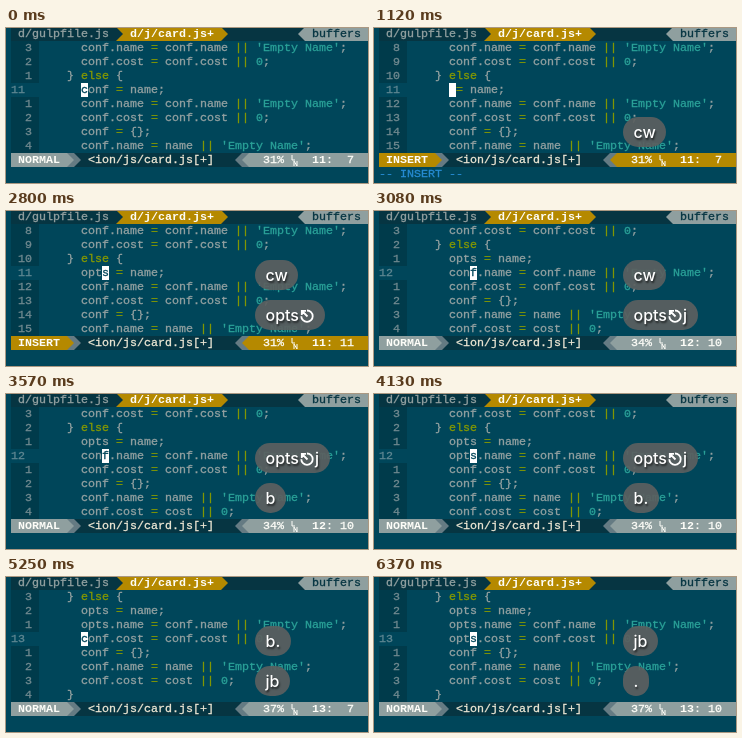
These frames come from a looping animation (362 by 155 pixels, 7070 ms). An HTML page:

```html
<!DOCTYPE html>
<html lang="en">
<head>
<meta charset="utf-8">
<title>Editor session</title>
<style>
  html, body { margin: 0; width: 100%; height: 100%; overflow: hidden; background: #00465a; }
  #stage { position: relative; width: 362px; height: 155px; overflow: hidden; }
  #screen { display: block; }
  #screen text { font-family: "Liberation Mono", monospace; font-size: 11.667px; white-space: pre; }
  .key {
    position: absolute; left: 249px; height: 30px; padding: 0 10.5px;
    border-radius: 15px; background: rgba(92, 96, 96, .92); color: #fff;
    font: 500 16px/30px Inter, sans-serif; white-space: pre;
    text-shadow: 1px 2px 2px rgba(0, 0, 0, .6);
  }
  .key svg { width: 16px; height: 16px; vertical-align: -3px; fill: none; stroke: #fff; stroke-width: 1.8; }
</style>
</head>
<body>
<div id="stage">
  <svg id="screen" width="362" height="155"></svg>
  <div id="keys"></div>
</div>
<script>
const LOOP = 7070, CELL = 7, ROW = 14, TOP = 13, LEFT = 5, CODE = 33;
const C = {
  back: '#00465a', gutter: '#003b4b', bar: '#063542', text: '#93a1a1', number: '#718a90',
  current: '#5f8792', green: '#859900', cyan: '#2aa198', blue: '#268bd2',
  yellow: '#b58900', grey: '#8f9f9f', slate: '#657b83', light: '#eee8d5', white: '#fdfdf8'
};

// Each step changes part of the state; keys run from newest to oldest.
const steps = [
  [0, { top: 8, line: 11, col: 7, shown: 0, mode: 'NORMAL', message: false,
        first: 'conf', second: 'conf', third: 'conf', keys: [], fade: 1 }],
  [700, { keys: ['c'] }],
  [1050, { keys: ['cw'] }],
  [1120, { mode: 'INSERT', message: true, first: '' }],
  [1750, { keys: ['o', 'cw'], first: 'o', col: 8 }],
  [1890, { keys: ['op', 'cw'], first: 'op', col: 9 }],
  [2170, { keys: ['opt', 'cw'] }],
  [2240, { first: 'opt', col: 10 }],
  [2310, { keys: ['opts', 'cw'] }],
  [2380, { first: 'opts', col: 11 }],
  [2730, { keys: ['opts⎋', 'cw'] }],
  [2800, { message: false, col: 10, shown: 11 }],
  [2940, { keys: ['opts⎋j', 'cw'] }],
  [3010, { mode: 'NORMAL', shown: 0 }],
  [3080, { top: 9, line: 12 }],
  ...fadeOut(3150, ['opts⎋j']),
  [3570, { keys: ['b', 'opts⎋j'] }],
  [3640, { col: 7 }],
  [4060, { keys: ['b.', 'opts⎋j'] }],
  [4130, { second: 'opts', col: 10 }],
  [4620, { keys: ['j', 'b.', 'opts⎋j'], top: 10, line: 13 }],
  [5040, { keys: ['jb', 'b.', 'opts⎋j'] }],
  [5110, { col: 7 }],
  ...fadeOut(5040, ['jb', 'b.']),
  [5390, { keys: ['.', 'jb', 'b.'], third: 'opts', col: 10 }],
  ...fadeOut(6160, ['.', 'jb'])
].sort((a, b) => a[0] - b[0]);

function fadeOut(start, left) {
  return [.75, .5, .25, 0].map((fade, i) =>
    [start + i * 70, fade ? { fade } : { fade: 1, keys: left }]);
}

const buffer = s => [
  "      conf.name = conf.name || 'Empty Name';",
  "      conf.cost = conf.cost || 0;",
  "    } else {",
  `      ${s.first} = name;`,
  `      ${s.second}.name = conf.name || 'Empty Name';`,
  `      ${s.third}.cost = conf.cost || 0;`,
  "      conf = {};",
  "      conf.name = name || 'Empty Name';",
  "      conf.cost = cost || 0;",
  "    }"
];

const escapeText = str => str.replace(/&/g, '&amp;').replace(/</g, '&lt;');
const rect = (x, y, w, h, fill) => `<rect x="${x}" y="${y}" width="${w}" height="${h}" fill="${fill}"/>`;
const arrow = (x, y, fill, dir = 1) =>
  `<path d="M${dir > 0 ? x : x + CELL} ${y}l${CELL * dir} 7l${-CELL * dir} 7z" fill="${fill}"/>`;

// A thin outline gives regular text the terminal's heavier smoothing.
function text(x, y, str, fill, bold) {
  const weight = bold ? 'font-weight="700"' : `stroke="${fill}" stroke-width=".3"`;
  return `<text x="${x}" y="${y + 10}" fill="${fill}" ${weight}>${escapeText(str)}</text>`;
}

function codeLine(str, y) {
  let out = '';
  for (const m of str.matchAll(/'[^']*'|\|\||else|=|\d+|[^\s'|=\d]+/g)) {
    const fill = /^['\d]/.test(m[0]) ? C.cyan : /^(\|\||else|=)$/.test(m[0]) ? C.green : C.text;
    out += text(CODE + m.index * CELL, y, m[0], fill);
  }
  return out;
}

function tabLine() {
  const y = TOP - ROW;
  return rect(LEFT, y, 357, ROW, C.bar) + text(12, y, 'd/gulpfile.js', C.text) +
    rect(110, y, 105, ROW, C.yellow) + arrow(110, y, C.bar) + arrow(215, y, C.yellow) +
    text(124, y, 'd/j/card.js+', C.white, true) +
    arrow(292, y, C.grey, -1) + rect(299, y, 63, ROW, C.grey) + text(306, y, 'buffers', C.bar);
}

function statusLine(s) {
  const y = TOP + 8 * ROW, accent = s.mode === 'INSERT' ? C.yellow : C.grey;
  const percent = Math.floor(s.line / 35 * 100) + '%';
  const column = String(s.shown || s.col).padStart(2, '\u00a0');
  return rect(LEFT, y, 357, ROW, C.bar) +
    rect(LEFT, y, 56, ROW, accent) + rect(61, y, 7, ROW, C.slate) +
    arrow(61, y, accent) + arrow(68, y, C.slate) +
    text(12, y, s.mode, C.white, true) + text(82, y, '<ion/js/card.js[+]', C.light) +
    arrow(229, y, C.slate, -1) + rect(236, y, 7, ROW, C.slate) +
    arrow(236, y, accent, -1) + rect(243, y, 119, ROW, accent) +
    text(257, y, percent, C.white) + text(306, y, s.line + ':', C.white, true) +
    text(334, y, column, C.white) +
    `<path d="M286 ${y + 2}v5h3M288 ${y + 13}v-5l3 5v-5" fill="none" stroke="${C.white}"/>`;
}

function drawScreen(s) {
  const lines = buffer(s);
  let out = rect(0, 0, 362, 155, C.back) + rect(LEFT, TOP, CODE - LEFT, 8 * ROW, C.gutter);
  for (let i = 0; i < 8; i++) {
    const n = s.top + i, y = TOP + i * ROW, here = n === s.line;
    const relative = s.mode === 'NORMAL';
    const label = String(relative && !here ? Math.abs(n - s.line) : n);
    const x = relative && here ? LEFT : 26 - label.length * CELL;
    if (here) out += rect(LEFT, y, CODE - LEFT, ROW, C.back);
    out += text(x, y, label, here ? C.current : C.number) + codeLine(lines[n - 8], y);
    if (here) {
      const cx = CODE + (s.col - 1) * CELL;
      out += rect(cx, y, CELL, ROW, '#fff') + text(cx, y, lines[n - 8][s.col - 1], C.back);
    }
  }
  if (s.message) out += text(LEFT, TOP + 9 * ROW, '-- INSERT --', C.blue);
  return out + tabLine() + statusLine(s);
}

const escapeIcon = '<svg viewBox="0 0 16 16"><path d="M8 2.5a5.7 5.7 0 1 1-5.7 5.7M8.5 8.5L3 3M2.8 7V2.8H7"/></svg>';
const drawKeys = s => s.keys.map((key, i) => {
  const opacity = i === s.keys.length - 1 ? s.fade : 1;
  return `<div class="key" style="top:${89 - 40 * i}px;opacity:${opacity}">${key.replace('⎋', escapeIcon)}</div>`;
}).join('');

const screenBox = document.getElementById('screen');
const keyBox = document.getElementById('keys');
const start = performance.now();
let drawn = -1;

function play() {
  const time = Math.max(0, performance.now() - start) % LOOP;
  const past = steps.filter(step => step[0] <= time);
  if (past.length !== drawn) {
    drawn = past.length;
    const state = Object.assign({}, ...past.map(step => step[1]));
    screenBox.innerHTML = drawScreen(state);
    keyBox.innerHTML = drawKeys(state);
  }
  requestAnimationFrame(play);
}
play();
</script>
</body>
</html>
```
